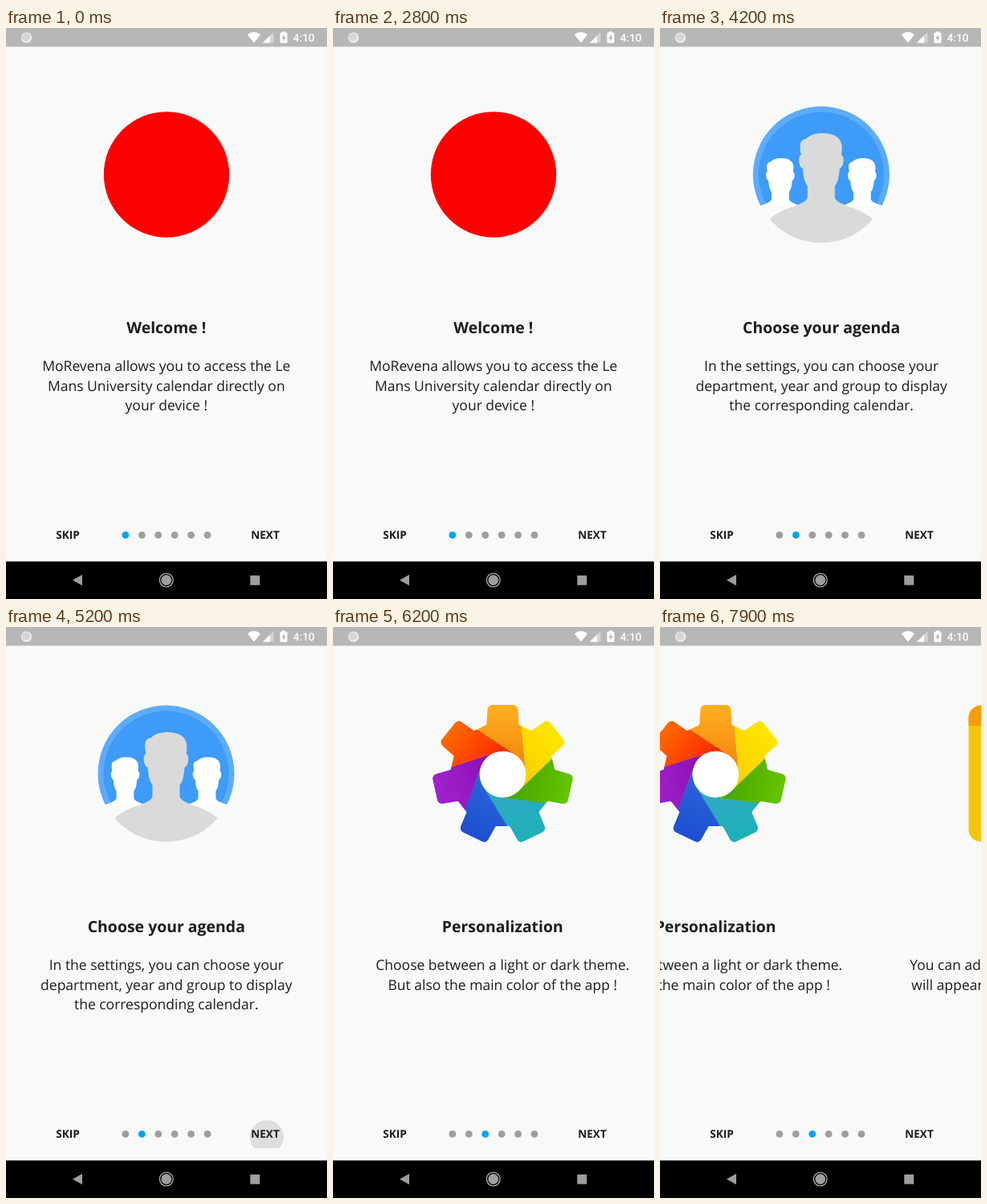
Animation, 400 px wide and 711 px high, one loop 8000 ms. Source, as an HTML page with a canvas:

```html
<!DOCTYPE html>
<html lang="en">
<head>
<meta charset="utf-8">
<title>App introduction</title>
<style>
  html, body { margin: 0; width: 100%; height: 100%; overflow: hidden; background: #f9f9f9; }
  canvas { display: block; width: 400px; height: 711px; }
</style>
</head>
<body>
<canvas id="stage"></canvas>
<script>
const W = 400, H = 711, LOOP = 8000, STEP = 100;
const BAR_BOTTOM = 23.35, NAV_TOP = 664.3;
const TAU = Math.PI * 2, RAD = Math.PI / 180;
const BG = '#f9f9f9', INK = '#1d1d1d', GREY = '#9e9e9e', BAR = '#b7b7b7';
const canvas = document.getElementById('stage');
const ctx = canvas.getContext('2d');
const dpr = window.devicePixelRatio || 1;
canvas.width = W * dpr;
canvas.height = H * dpr;
ctx.textRendering = 'geometricPrecision';

const TITLE = 'bold 19.46px "Open Sans", sans-serif';
const BODY = '17.51px "Open Sans", sans-serif';
const BUTTON = 'bold 13.62px "Open Sans", sans-serif';
const CLOCK = '500 13.62px Roboto, sans-serif';

const pages = [
  { icon: drawLogo, title: 'Welcome !',
    lines: ['MoRevena allows you to access the Le', 'Mans University calendar directly on', 'your device !'] },
  { icon: drawPeople, title: 'Choose your agenda',
    lines: ['In the settings, you can choose your', 'department, year and group to display', 'the corresponding calendar.'] },
  { icon: drawGear, title: 'Personalization',
    lines: ['Choose between a light or dark theme.', 'But also the main color of the app !'] },
  { icon: drawNote, title: 'Your events',
    lines: ['You can add your own events, they', 'will appear within your calendar.'] }
];

function text(str, x, y, font, color = INK, align = 'center') {
  ctx.font = font;
  ctx.fillStyle = color;
  ctx.textAlign = align;
  ctx.fillText(str, x, y);
}

function disc(x, y, r, color) {
  ctx.fillStyle = color;
  ctx.beginPath();
  ctx.arc(x, y, r, 0, TAU);
  ctx.fill();
}

function rect(x, y, w, h, color) {
  ctx.fillStyle = color;
  ctx.fillRect(x, y, w, h);
}

function poly(points, color) {
  ctx.fillStyle = color;
  ctx.beginPath();
  points.forEach(([x, y]) => ctx.lineTo(x, y));
  ctx.closePath();
  ctx.fill();
}

// Smooth progress from 0 to 1 between two times
function ease(t, from, to) {
  const x = Math.min(1, Math.max(0, (t - from) / (to - from)));
  return (1 - Math.cos(Math.PI * x)) / 2;
}

function scrollAt(t) {
  return 400 * ease(t, 3430, 4230) + 388.5 * ease(t, 5400, 6200) + 411.5 * ease(t, 7480, 8530);
}

function drawLogo() {
  disc(200, 182.5, 78.2, '#fd0000');
}

function figure(x, y, scale, color) {
  ctx.save();
  ctx.translate(x, y);
  ctx.scale(scale, scale);
  ctx.fillStyle = color;
  ctx.beginPath();
  ctx.moveTo(-64, 107);
  ctx.bezierCurveTo(-48, 91, -17, 90, -17, 79);
  ctx.lineTo(-17, 66);
  ctx.quadraticCurveTo(-22, 60, -23, 44);
  ctx.bezierCurveTo(-29, 42, -29, 27, -25, 27);
  ctx.bezierCurveTo(-28, 14, -26, 8, -19, 7);
  ctx.bezierCurveTo(-10, -2, 8, -1, 17, 3);
  ctx.bezierCurveTo(26, 8, 27, 16, 25, 27);
  ctx.bezierCurveTo(29, 27, 29, 42, 23, 44);
  ctx.quadraticCurveTo(22, 60, 17, 66);
  ctx.lineTo(17, 79);
  ctx.bezierCurveTo(17, 90, 48, 91, 64, 107);
  ctx.lineTo(64, 150);
  ctx.lineTo(-64, 150);
  ctx.fill();
  ctx.restore();
}

function drawPeople() {
  ctx.save();
  ctx.beginPath();
  ctx.arc(199.5, 182.5, 85, 0, TAU);
  ctx.clip();
  rect(110, 95, 180, 126, '#5dacf7');
  disc(199.5, 182.5, 78, '#3e9bf7');
  rect(110, 221, 180, 50, BG);
  figure(148.5, 162, 0.64, '#fff');
  figure(250.5, 162, 0.64, '#fff');
  rect(110, 222, 180, 50, BG);
  figure(199.5, 131, 1, '#dadada');
  ctx.restore();
}

const wedges = [
  ['#ffb01f', '#f58a12'], ['#ffe600', '#f8d000'], ['#66c400', '#48a800'],
  ['#1eb0b8', '#2fa9c4'], ['#1c4fd0', '#2a62da'], ['#a022cc', '#8e12b8'],
  ['#ff6a00', '#fb2c00']
];
const TURN = TAU / wedges.length;

function gearPath() {
  const pts = [];
  wedges.forEach((_, k) => {
    for (const [deg, r] of [[-18, 65], [-12.2, 88.5], [12.2, 88.5], [18, 65]]) {
      const a = k * TURN + deg * RAD;
      pts.push([r * Math.sin(a), -r * Math.cos(a), r > 80 ? 6 : 2]);
    }
  });
  const last = pts[pts.length - 1];
  ctx.beginPath();
  ctx.moveTo((last[0] + pts[0][0]) / 2, (last[1] + pts[0][1]) / 2);
  pts.forEach(([x, y, r], i) => {
    const next = pts[(i + 1) % pts.length];
    ctx.arcTo(x, y, next[0], next[1], r);
  });
  ctx.closePath();
}

function drawGear() {
  const hole = 28.7, tangent = -5.5 * RAD;
  ctx.save();
  ctx.translate(200, 183.5);
  gearPath();
  ctx.clip();
  wedges.forEach(([outer, inner], k) => {
    ctx.save();
    ctx.rotate(k * TURN);
    const fill = ctx.createLinearGradient(0, -86, 0, -20);
    fill.addColorStop(0, outer);
    fill.addColorStop(1, inner);
    ctx.fillStyle = fill;
    const edge = a => [
      hole * Math.cos(a) + 130 * Math.sin(a),
      hole * Math.sin(a) - 130 * Math.cos(a)
    ];
    ctx.beginPath();
    ctx.moveTo(...edge(tangent - TURN));
    ctx.arc(0, 0, hole, tangent - TURN, tangent + 0.01);
    ctx.lineTo(...edge(tangent + 0.01));
    ctx.fill();
    ctx.restore();
  });
  disc(0, 0, hole, '#fff');
  ctx.restore();
}

function drawNote() {
  ctx.save();
  ctx.beginPath();
  ctx.roundRect(115, 97.5, 170, 170, 16);
  ctx.clip();
  rect(115, 97, 170, 171, '#f3c60a');
  rect(115, 97, 170, 26, '#f79c0c');
  ctx.restore();
}

function drawPage(page, index, scroll) {
  const x = index * W - scroll;
  if (Math.abs(x) >= W) return;
  ctx.save();
  ctx.translate(x, 0);
  page.icon();
  text(page.title, 199.8, 380, TITLE);
  page.lines.forEach((line, i) => {
    const y = 427.3 + i * 24.3;
    if (index === 3) text(line, 42 + i * 2, y, BODY, INK, 'left');
    else text(line, 199.8, y, BODY);
  });
  ctx.restore();
}

function drawRipple(t) {
  if (t < 5000 || t >= 5500) return;
  const r = Math.min(60, 9 + (t - 5000) * 0.06);
  const alpha = 0.11 * Math.min(1, (5500 - t) / 250);
  ctx.save();
  ctx.beginPath();
  ctx.rect(271, 614, 106, 35);
  ctx.clip();
  disc(325, 635, r, `rgba(0,0,0,${alpha})`);
  ctx.restore();
}

function drawControls(t, scroll) {
  drawRipple(t);
  text('SKIP', 77, 636.2, BUTTON);
  text('NEXT', 323, 636.2, BUTTON);
  const active = Math.round(scroll / W);
  for (let i = 0; i < 6; i++) {
    disc(148.9 + i * 20.43, 631.4, 4.4, i === active ? '#03a4f0' : GREY);
  }
}

function drawStatusBar() {
  rect(0, 0, W, BAR_BOTTOM, BAR);
  disc(25.5, 12, 6.6, '#efefef');
  disc(25, 11.6, 5, '#d6d6d6');

  // Wi-Fi
  ctx.fillStyle = '#fff';
  ctx.beginPath();
  ctx.moveTo(309, 18.5);
  ctx.lineTo(300.8, 8.2);
  ctx.quadraticCurveTo(309, 1.8, 317.2, 8.2);
  ctx.fill();

  // Signal
  poly([[320, 18.5], [333.5, 18.5], [333.5, 5]], 'rgba(255,255,255,.4)');
  poly([[320, 18.5], [329, 18.5], [329, 9.5]], '#fff');

  // Battery
  rect(344, 4.5, 4, 2, '#fff');
  ctx.beginPath();
  ctx.roundRect(341.5, 5.8, 9, 13, 1);
  ctx.fill();
  poly([[346.8, 8], [343.4, 13], [345.4, 13], [345.4, 16.8], [348.7, 11.6], [346.8, 11.6]], BAR);

  text('4:10', 371.2, 17, CLOCK, '#fff');
}

function drawNavBar() {
  rect(0, NAV_TOP, W, H - NAV_TOP, '#000');
  poly([[83, 687.5], [95, 680.8], [95, 694.2]], GREY);
  disc(199.8, 687.5, 6.4, GREY);
  ctx.strokeStyle = '#b0b0b0';
  ctx.lineWidth = 1.3;
  ctx.beginPath();
  ctx.arc(199.8, 687.5, 8.4, 0, TAU);
  ctx.stroke();
  rect(304.3, 681.7, 12, 12, GREY);
}

function draw(t) {
  const scroll = scrollAt(t);
  ctx.setTransform(dpr, 0, 0, dpr, 0, 0);
  rect(0, 0, W, H, BG);
  pages.forEach((page, i) => drawPage(page, i, scroll));
  drawControls(t, scroll);
  drawStatusBar();
  drawNavBar();
}

const start = performance.now();
function tick() {
  const t = (performance.now() - start) % LOOP;
  draw(Math.floor(t / STEP) * STEP);
  requestAnimationFrame(tick);
}
tick();
</script>
</body>
</html>
```
